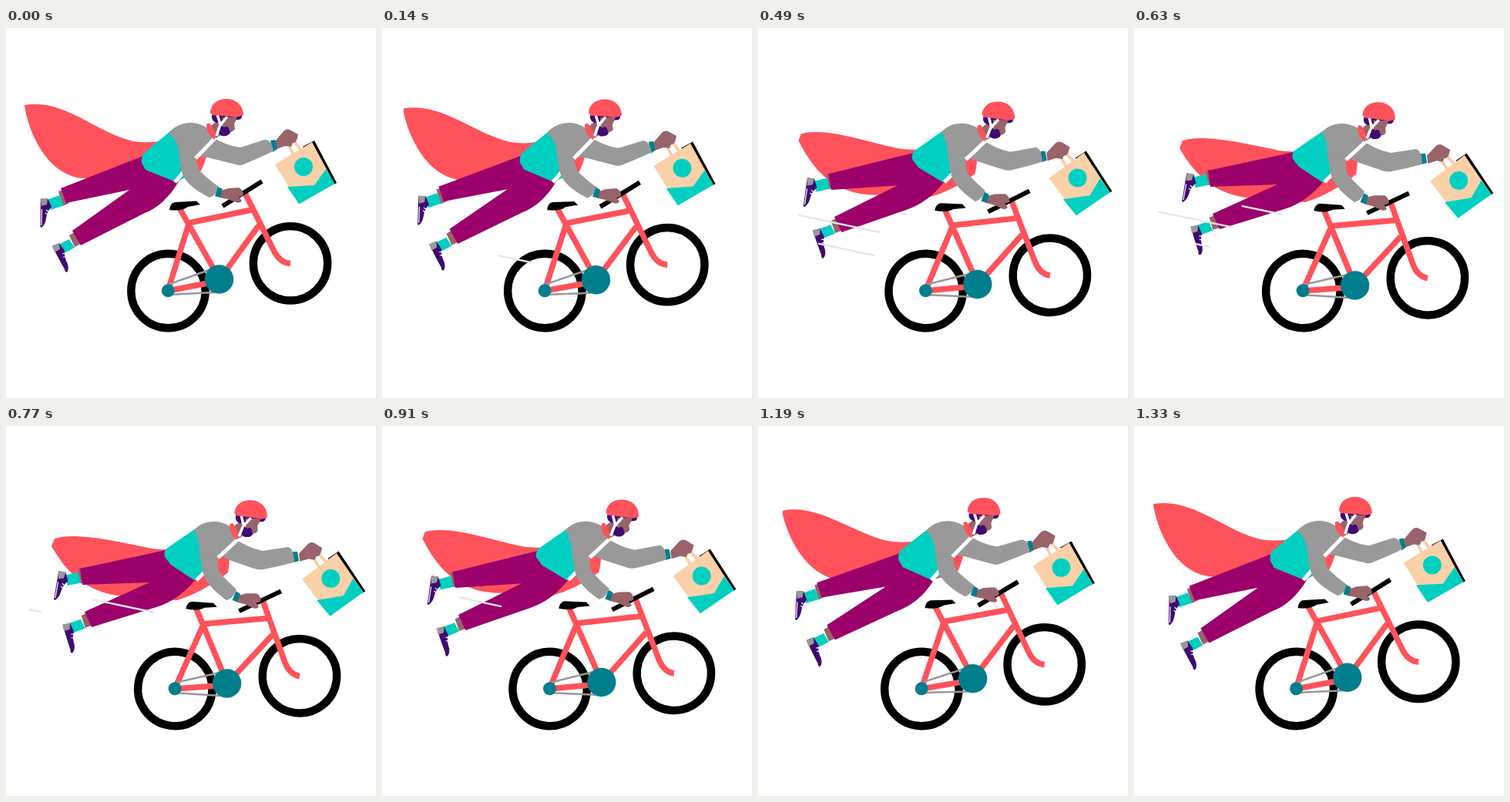
An HTML page that plays this animation: 480x480 px, repeating every 1.4 s.

```html
<!DOCTYPE html>
<html lang="en">
<head>
<meta charset="utf-8">
<title>Flying courier</title>
<style>
html, body { margin: 0; width: 100%; height: 100%; overflow: hidden; background: #fff; }
svg { display: block; width: 100vw; height: 100vh; }
</style>
</head>
<body>
<svg id="stage" viewBox="0 0 480 480"></svg>
<script>
const LOOP = 1400, STEP = 70;
const C = {
  red: '#ff525b', teal: '#00cfc1', deep: '#007e8c', plum: '#9b006b', grey: '#999',
  skin: '#98636a', ink: '#3f0a72', tan: '#fad0a8', black: '#000', white: '#fff', speed: '#e6e6e6'
};
const stage = document.getElementById('stage');
const updates = [];

function add(parent, tag, attrs) {
  const el = document.createElementNS('http://www.w3.org/2000/svg', tag);
  for (const name in attrs) el.setAttribute(name, attrs[name]);
  parent.appendChild(el);
  return el;
}
const fill = (g, color, d) => add(g, 'path', { d, fill: color });
const line = (g, color, width, d) =>
  add(g, 'path', { d, fill: 'none', stroke: color, 'stroke-width': width, 'stroke-linejoin': 'round' });
const disc = (g, color, cx, cy, r) => add(g, 'circle', { cx, cy, r, fill: color });

// Group that shifts by (dx, dy) and turns about (cx, cy) as the pose goes 0..1
function rig(cx, cy, dx, dy, turn) {
  const g = add(stage, 'g', {});
  updates.push(k => g.setAttribute('transform',
    `translate(${dx * k} ${dy * k}) rotate(${turn * k} ${cx} ${cy})`));
  return g;
}

// Path blended between two outlines with the same commands
function morph(color, from, to, width) {
  const el = width ? line(stage, color, width, from) : fill(stage, color, from);
  const number = /-?\d+(\.\d+)?/g;
  const end = to.match(number).map(Number);
  updates.push(k => {
    let i = 0;
    el.setAttribute('d', from.replace(number, n => (+n + (end[i++] - n) * k).toFixed(2)));
  });
}

// Cape
morph(C.red,
  'M24 100C75 91 115 135 165 147Q185 150 205 146L235 140L262 160Q258 176 252 187Q240 192 215 194L105 195C58 196 31 142 24.5 103Z',
  'M63 146C90 137 145 150 180 157Q195 161 212 160L262 145L290 165Q290 180 288 190Q255 216 222 226L152 221C105 216 80 192 59 156Q57 150 63 146Z');

// Bike
const bike = rig(210.5, 341, 8.8, 0, 6.8);
for (const [x, y] of [[210.5, 341], [369, 305.3]])
  add(bike, 'circle', { cx: x, cy: y, r: 48.2, fill: 'none', stroke: C.black, 'stroke-width': 10.4 });
line(bike, C.red, 7.5, 'M223 230L277 326L328 256M237 253L318 236M210 341L238 251M210 341L277 328');
line(bike, C.red, 7.5, 'M309 212L348 290Q356 305 369 305.5');
line(bike, C.grey, 2.5, 'M210 333L266 313M210 346L270 343');
disc(bike, C.deep, 276.5, 326, 18.7);
disc(bike, C.deep, 210.3, 340.8, 8.5);
fill(bike, C.black, 'M212 236Q213 227 219 226L247 224.5L252 229L236 232Q228 238 212 236Z');
line(bike, C.black, 6, 'M281 231L332 199');

// Bag
const bag = rig(389, 187.5, 36, 17.5, -6);
line(bag, C.tan, 4, 'M373 165L365 148M383 159L375 148');
fill(bag, C.black, 'M385 154L400 146L429 201L425 203Z');
fill(bag, C.tan, 'M349 177L397 148L426 202L380 228Z');
fill(bag, C.teal, 'M365 206L400 204L415 183L426.5 202L380 228.5Z');
disc(bag, C.teal, 386, 180, 12);

// Far arm
const farHand = rig(365, 144, 31, 19.5, 3);
fill(farHand, C.skin, 'M349 147L360 134Q364 130 369 132.5L379 138L377 146Q375 150 372 149L370 154L362 153L351 157Z');
morph(C.deep, 'M343 146L349 145L352 157L346 161Z', 'M372 163L378 163L380 175L373 177Z');
morph(C.grey,
  'M262 138Q285 153 304 155L335 145Q344 144 347 159Q346 161 308 177Q303 179 298 177L262 168L249 167Z',
  'M293 143Q312 158 333 162L366 157Q373 159 374 176Q373 178 334 186Q328 187 322 185L290 174L278 168Z');

// Legs and feet
const shin = (g, skin, sock) => { fill(g, C.skin, skin); fill(g, C.teal, sock); };
shin(rig(64, 227, 23, -28, 8), 'M68 212L78 209L82 227L74 231Z', 'M53 223L69 217L75 230L58 236Z');
shin(rig(80, 281, 14, -23.5, 8), 'M82 269L90 264L99 279L89 284Z', 'M68 281L82 274L89 285L74 293Z');

const shoe1 = rig(51, 239, 20.5, -32, 9);
fill(shoe1, C.ink, 'M45 221L54 221L59 232Q53 238 52 247Q51 255 46 259L44.5 258Z');
fill(shoe1, C.grey, 'M45 221L54 221L53 229L46 231Z');
line(shoe1, C.white, 1.2, 'M46.5 235L46 256M52 236L56 239M51 240L54 242');

const shoe2 = rig(70, 298, 10.5, -23.5, 11);
fill(shoe2, C.ink, 'M60 283L69 279L76 289Q75 297 80 306Q82 313 79 317L77 316Z');
fill(shoe2, C.grey, 'M60 283L69 279L70 287L63 291Z');
line(shoe2, C.white, 1.2, 'M65 295L76 314M73 293L77 292M74 297L78 297');

morph(C.plum,
  'M71 208L178 166L224 199C212 220 196 234 180 240L97 282L86 263L160 210L78 227Z',
  'M96 185L207 161L246 199C232 216 215 229 195 235L111 261L102 241L186 203L99 206Z');

// Torso
morph(C.teal,
  'M213 134L179 162Q175 168 176 175L181 184L221 200L232 194L230 150Z',
  'M246 133L208 159Q204 164 206 170L214 180L244 200L259 194L258 150Z');
morph(C.white, 'M230 187L219 200', 'M257 190L247 200', 5);
morph(C.grey,
  'M211 136C222 123 244 117 263 131L268 145L246 168L250 183Q253 189 276 206Q273 217 264 220Q236 206 229 190Q226 180 224 160Q222 145 211 136Z',
  'M244 135C254 123 275 119 294 132L298 148L275 169L275 185Q277 192 299 212Q295 224 286 226Q262 209 256 192Q253 180 251 160Q250 145 244 135Z');
morph(C.white, 'M271 143L246 169', 'M301 147L275 171', 5);

// Near hand
const hand = rig(293, 217, 22.5, 9.5, 4);
fill(hand, C.skin, 'M277 212L288 208L302 207Q308 210 308 216Q307 219 302 219L306 224Q304 228 298 226L288 222L277 220Z');
fill(hand, C.deep, 'M275 206L281 209L278 220L271 218Z');

// Head
const head = rig(287, 105, 31.5, 4.3, 4);
fill(head, C.skin, 'M266 127L276 118L280 138L272 143Z');
fill(head, C.red, 'M260 125Q264 122 266 126L272 136L271 145Q260 138 260 125Z');
fill(head, C.ink, 'M267 113L306 112Q307 119 301 119L284 120L274 123Q266 121 267 113Z');
fill(head, C.skin, 'M280 116L300 115L296 125L297 131Q294 136 288 135L281 128Z');
fill(head, C.ink, 'M276 124L283 129Q287 126 289 130L291 136Q288 141 280 140Q273 137 276 124Z');
line(head, C.white, 3.5, 'M274 112L278 125L273 140M287 115L278 126');
fill(head, C.red, 'M265 110C266 97 276 92 286 92C300 92 308 102 308 113Q302 116 295 115L268 113Z');

// Speed lines: start point, end x, then [delay, duration] for the leading and trailing ends
const speedLines = [
  [193, 304, 78, [70, 420], [420, 420]],
  [158, 265, 30, [280, 420], [600, 300]],
  [193, 242, 98, [470, 570], [824, 467]]
].map(([x, y, end, lead, trail]) =>
  ({ x, y, end, lead, trail, el: line(stage, C.speed, 2.3, '') }));

function ease(t, [delay, duration]) {
  const u = Math.min(1, Math.max(0, (t - delay) / duration));
  return 1 - Math.pow(1 - u, 2.5);
}

function drawSpeed(t) {
  for (const s of speedLines) {
    const a = ease(t, s.lead), b = ease(t, s.trail);
    const at = u => {
      const x = s.x + (s.end - s.x) * u;
      return `${x} ${s.y + (x - s.x) * 0.211}`;
    };
    s.el.setAttribute('d', a - b > 0.001 ? `M${at(a)}L${at(b)}` : '');
  }
}

function frame() {
  const t = Math.floor((performance.now() % LOOP) / STEP) * STEP;
  const pose = 0.5125 * (1 - Math.cos(2 * Math.PI * t / LOOP));
  updates.forEach(update => update(pose));
  drawSpeed(t);
  requestAnimationFrame(frame);
}
frame();
</script>
</body>
</html>
```
